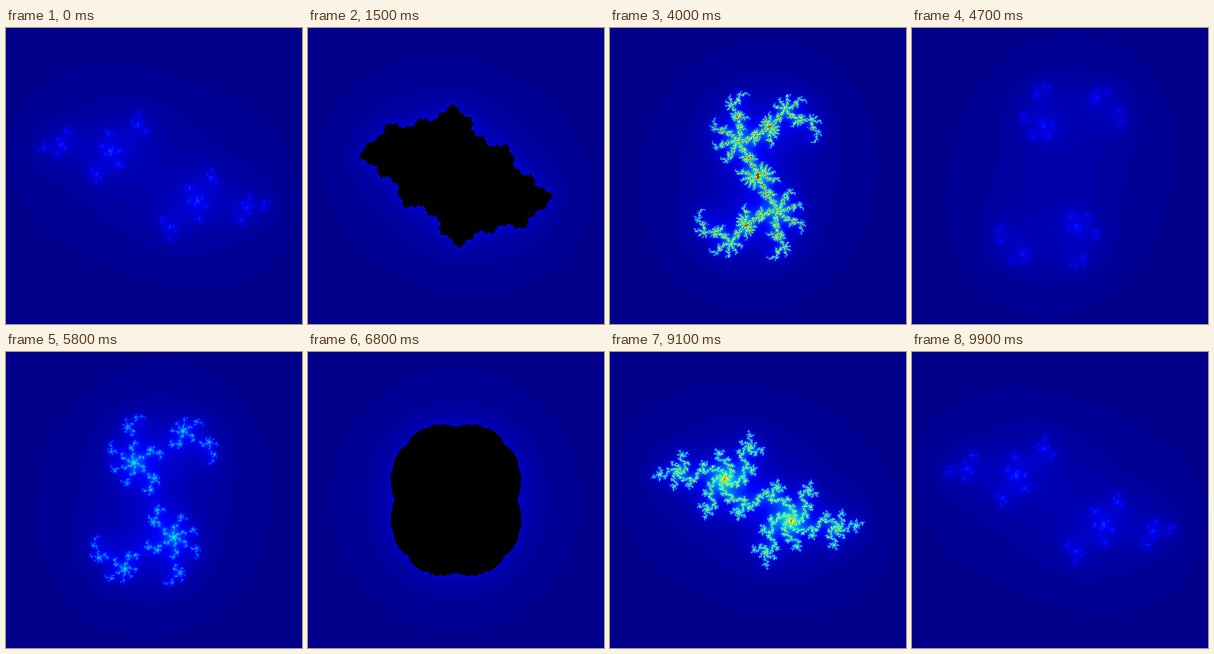
An HTML page with a canvas for the animation above (10000 ms loop, 500 by 500 pixels).

```html
<!DOCTYPE html>
<html lang="en">
<head>
<meta charset="utf-8">
<title>Julia set</title>
<style>
  html, body { margin: 0; width: 100%; height: 100%; overflow: hidden; background: #00008a; }
  canvas { display: block; width: 500px; height: 500px; }
</style>
</head>
<body>
<canvas id="stage" width="500" height="500"></canvas>
<script>
const SIZE = 500, SPAN = 2, RADIUS = 3, MAX_ITER = 100;
const STEPS = 50, STEP_MS = 100;
const FROM = { re: -0.82, im: -0.73 }, TO = { re: 0.7, im: 0.42 };
const BLACK = 0xff000000;

const ctx = document.getElementById('stage').getContext('2d');
const cache = [];

// Jet colour map, packed as ABGR
const channel = (x, peak) =>
  Math.round(255 * Math.min(1, Math.max(0, 1.5 - Math.abs(4 * x - peak))));
const palette = Array.from({ length: MAX_ITER }, (_, n) => {
  const x = (n + 1) / MAX_ITER;
  return (BLACK | channel(x, 1) << 16 | channel(x, 2) << 8 | channel(x, 3)) >>> 0;
});

const lerp = (a, b, t) => a + (b - a) * t;
const coord = i => SPAN * (2 * i / (SIZE - 1) - 1);

function colorAt(x, y, cx, cy) {
  for (let n = 0; n < MAX_ITER; n++) {
    const re = x * x - y * y + cx;
    y = 2 * x * y + cy;
    x = re;
    if (x * x + y * y > RADIUS * RADIUS) return palette[n];
  }
  return BLACK;
}

function render(step) {
  const t = step / (STEPS - 1);
  const cx = lerp(FROM.re, TO.re, t), cy = lerp(FROM.im, TO.im, t);
  const image = ctx.createImageData(SIZE, SIZE);
  const pixels = new Uint32Array(image.data.buffer);
  const last = pixels.length - 1;
  // The set has point symmetry, so half the rows are enough
  for (let row = 0, i = 0; row < SIZE / 2; row++) {
    const y = coord(row);
    for (let col = 0; col < SIZE; col++, i++) {
      pixels[i] = pixels[last - i] = colorAt(coord(col), y, cx, cy);
    }
  }
  return image;
}

let shown = -1;
function draw(ms) {
  const tick = Math.floor(Math.max(0, ms) / STEP_MS) % (2 * STEPS);
  const step = Math.min(tick, 2 * STEPS - 1 - tick);
  if (step === shown) return;
  shown = step;
  cache[step] = cache[step] || render(step);
  ctx.putImageData(cache[step], 0, 0);
}

const start = performance.now();
function loop() {
  draw(performance.now() - start);
  requestAnimationFrame(loop);
}
loop();
</script>
</body>
</html>
```
